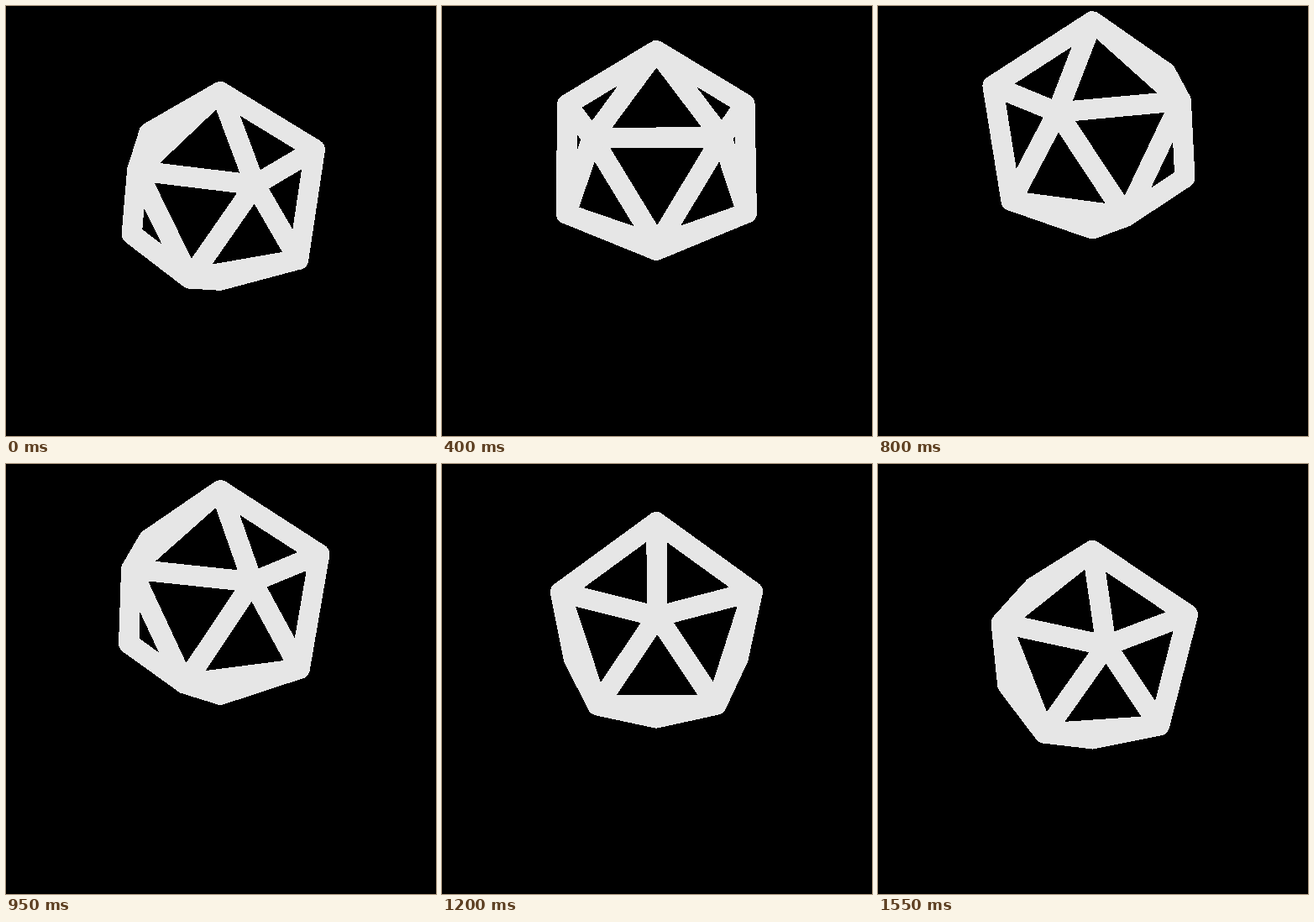
An HTML page with a canvas that plays this animation: 512 by 512 pixels, repeating every 1.6 s.

```html
<!DOCTYPE html>
<html lang="en">
<head>
<meta charset="utf-8">
<title>Spinning icosahedron</title>
<style>
  html, body { margin: 0; width: 100%; height: 100%; overflow: hidden; background: #000; }
  canvas { display: block; width: 512px; height: 512px; }
</style>
</head>
<body>
<canvas id="stage" width="512" height="512"></canvas>
<script>
const SIZE = 512;
const ctx = document.getElementById('stage').getContext('2d', { willReadFrequently: true });
const RAD = Math.PI / 180;
const LOOP = 1600;
const STEP = 50;
const camera = { focal: 711.1, pitch: 26.44 * RAD, distance: 10.105, height: 4.958 };
const solid = { radius: 1.889, low: 0.5, rise: 1.175, startAngle: 18.5 };
const origin = { x: 255.2, y: 256.4 };

// Angle 0 faces the camera; positive angles turn to the right.
function project(ring, height, degrees) {
  const x = ring * Math.sin(degrees * RAD);
  const z = camera.distance - ring * Math.cos(degrees * RAD);
  const y = height - camera.height;
  const sin = Math.sin(camera.pitch), cos = Math.cos(camera.pitch);
  const scale = camera.focal / (z * cos - y * sin);
  return [origin.x + x * scale, origin.y - (y * cos + z * sin) * scale];
}

function bobHeight(time) {
  const phase = ((time + STEP) % LOOP) / (LOOP / 2);
  const u = phase < 1 ? phase : 2 - phase;
  return solid.low + solid.rise * u * u * (3 - 2 * u);
}

function icosahedronFaces(time) {
  const center = bobHeight(time);
  const spin = solid.startAngle + 360 * time / LOOP;
  const offset = solid.radius / Math.sqrt(5);
  const top = project(0, center + solid.radius, 0);
  const bottom = project(0, center - solid.radius, 0);
  const upper = i => project(2 * offset, center + offset, spin + 72 * i);
  const lower = i => project(2 * offset, center - offset, spin + 36 + 72 * i);
  const faces = [];
  for (let i = 0; i < 5; i++) {
    const u0 = upper(i), u1 = upper(i + 1), l0 = lower(i), l1 = lower(i + 1);
    faces.push([top, u0, u1], [u0, l0, u1], [u1, l0, l1], [l0, bottom, l1]);
  }
  return faces;
}

function facesCamera([a, b, c]) {
  return (b[0] - a[0]) * (c[1] - a[1]) - (b[1] - a[1]) * (c[0] - a[0]) < 0;
}

// Gives the strokes hard, unsmoothed edges.
function hardenEdges() {
  const image = ctx.getImageData(0, 0, SIZE, SIZE);
  const { data } = image;
  for (let i = 3; i < data.length; i += 4) data[i] = data[i] < 128 ? 0 : 255;
  ctx.putImageData(image, 0, 0);
}

function draw(time) {
  ctx.clearRect(0, 0, SIZE, SIZE);
  ctx.strokeStyle = '#e6e6e6';
  ctx.lineWidth = 24.2;
  ctx.lineJoin = 'round';
  ctx.beginPath();
  for (const face of icosahedronFaces(time).filter(facesCamera)) {
    face.forEach(([x, y], i) => i ? ctx.lineTo(x, y) : ctx.moveTo(x, y));
    ctx.closePath();
  }
  ctx.stroke();
  hardenEdges();
}

const start = performance.now();
let shown = -1;
function tick() {
  const elapsed = (performance.now() - start) % LOOP;
  const time = Math.floor(elapsed / STEP) * STEP;
  if (time !== shown) draw(shown = time);
  requestAnimationFrame(tick);
}
tick();
</script>
</body>
</html>
```
